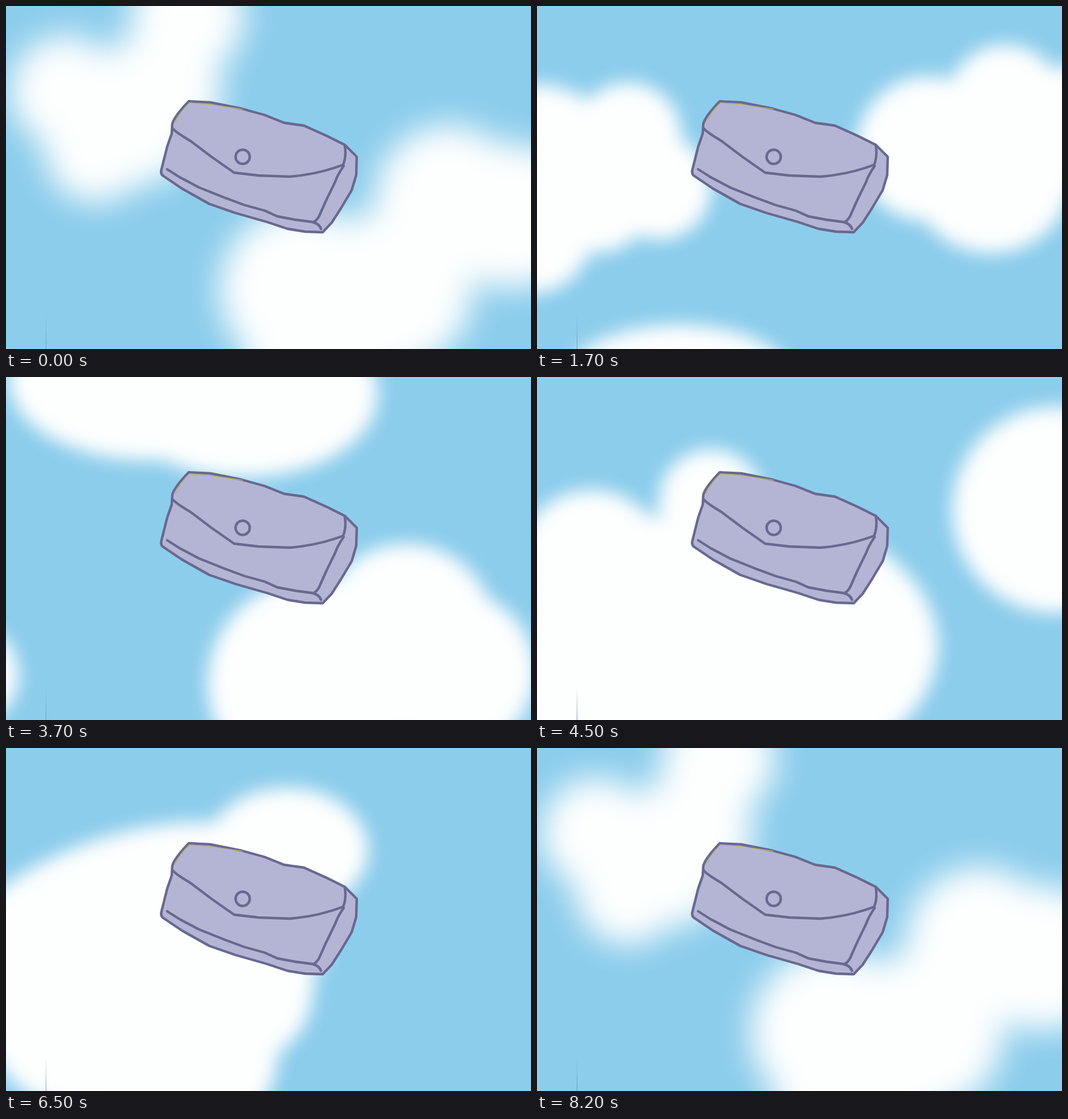
Animation of 925 by 605 pixels, one loop 8300 ms. Source, as an HTML page:

```html
<!DOCTYPE html>
<html lang="en">
<head>
<meta charset="utf-8">
<title>Purse in the sky</title>
<style>
  html, body { margin: 0; width: 100%; height: 100%; overflow: hidden; background: #8ccdec; }
  svg { display: block; width: 925px; height: 605px; }
</style>
</head>
<body>
<svg viewBox="0 0 925 605" xmlns="http://www.w3.org/2000/svg">
  <defs>
    <filter id="soft" filterUnits="userSpaceOnUse" x="-250" y="-250" width="1450" height="1100" color-interpolation-filters="sRGB">
      <feGaussianBlur stdDeviation="16"/>
    </filter>
    <filter id="hazy" filterUnits="userSpaceOnUse" x="-250" y="-250" width="1450" height="1100" color-interpolation-filters="sRGB">
      <feGaussianBlur stdDeviation="28"/>
    </filter>
    <linearGradient id="fade" x1="0" y1="0" x2="0" y2="1">
      <stop offset="0" stop-color="#6a9cb8" stop-opacity="0"/>
      <stop offset="1" stop-color="#6a9cb8"/>
    </linearGradient>
  </defs>
  <rect width="925" height="605" fill="#8ccdec"/>
  <g id="sky" fill="#fdfefe"></g>
  <rect x="70" y="545" width="1" height="60" fill="url(#fade)"/>
  <g fill="none" stroke="#69688f" stroke-width="4.4" stroke-linecap="round" stroke-linejoin="round">
    <path fill="#b4b5d5" d="M322 168L360 170L415 181L455 192L490 206L525 211L565 229L597 245L618 266L617 298L609 325L590 357L574 382L558 399L527 398L496 393L460 381L404 365L358 349L310 322L276 299Q272 295 274 288L284 248L292 225L293 208Q296 195 322 168Z"/>
    <path d="M294 216Q298 222 325 238L362 266L402 294L445 299L500 301Q550 297 594 280Q600 265 597 247"/>
    <path d="M595 282Q584 298 580 310L563 345L552 370Q548 378 542 381"/>
    <path d="M284 288L306 302L340 320L385 338L420 351L456 361L478 371L510 377L540 381Q552 384 555 393"/>
    <circle cx="417" cy="266" r="12.5"/>
    <path stroke="#b5b16c" stroke-width="1.5" d="M298 206Q305 188 323 171L362 174L416 182"/>
  </g>
</svg>
<script>
const LOOP = 8300, STEP = 100;
const sky = document.getElementById('sky');

// The view drifts from one group of clouds to the next.
// at: arrival time, drift: way from the group before, puffs: x, y, rx, ry = rx, tilt.
const home = [
  [105, 150, 98], [160, 255, 92], [245, 235, 78], [320, 20, 100], [270, 150, 110],
  [780, 340, 130], [890, 370, 128], [520, 500, 144], [680, 500, 142], [560, 610, 140]
];
const scenes = [
  { at: 0, drift: [0, 0], puffs: home, blur: 'hazy' },
  { at: 1700, drift: [850, -600], puffs: [
    [0, 290, 152], [160, 230, 95], [215, 320, 92], [110, 350, 85], [-10, 400, 107],
    [825, 170, 102], [690, 252, 128], [800, 306, 140, 130], [945, 215, 110],
    [250, 660, 200, 98]] },
  { at: 2800, drift: [605, -505], puffs: [
    [0, 230, 117], [185, 200, 94], [205, 280, 88], [90, 310, 155, 104],
    [885, 200, 158], [775, 262, 132], [880, 330, 145],
    [375, 600, 103], [430, 640, 140, 95], [250, 640, 150, 85]] },
  { at: 3700, drift: [330, -225], puffs: [
    [420, 30, 235, 147], [250, 5, 245, 142],
    [705, 450, 156], [790, 520, 142], [537, 540, 182], [-70, 525, 92]] },
  { at: 5400, drift: [800, -650], puffs: [
    [335, 328, 127], [430, 225, 132], [420, 400, 85], [575, 430, 140],
    [760, 130, 370, 245], [520, -10, 135], [-75, 600, 120]] },
  { at: 6500, drift: [605, -395], puffs: [
    [495, 180, 143, 110], [200, 330, 340, 172, -20], [430, 320, 140],
    [400, 420, 142], [300, 530, 180], [130, 470, 167]] },
  { at: 8200, drift: [880, -640], puffs: home, blur: 'hazy' }
];

function puff([x, y, rx, ry = rx, tilt = 0]) {
  return `<ellipse rx="${rx}" ry="${ry}" transform="translate(${x} ${y}) rotate(${tilt})"/>`;
}

for (const s of scenes) {
  const shapes = s.puffs.map(puff).join('');
  sky.insertAdjacentHTML('beforeend', `<g><g filter="url(#${s.blur || 'soft'})">${shapes}</g></g>`);
  s.node = sky.lastElementChild;
}

function place(scene, k) {
  const [x, y] = k.drift;
  scene.node.style.display = '';
  scene.node.setAttribute('transform', `translate(${x * k.part} ${y * k.part})`);
}

function draw(t) {
  scenes.forEach(s => { s.node.style.display = 'none'; });
  const i = scenes.filter(s => s.at <= t).length - 1;
  const now = scenes[i], next = scenes[i + 1];
  if (t === now.at || !next) return place(now, { drift: now.drift, part: 0 });
  const part = (t - now.at) / (next.at - now.at), drift = next.drift;
  place(now, { drift, part });
  place(next, { drift, part: part - 1 });
}

const start = performance.now();
let shown = -1;
function tick() {
  const t = Math.floor((performance.now() - start) / STEP) * STEP % LOOP;
  if (t !== shown) draw(shown = t);
  requestAnimationFrame(tick);
}
tick();
</script>
</body>
</html>
```
